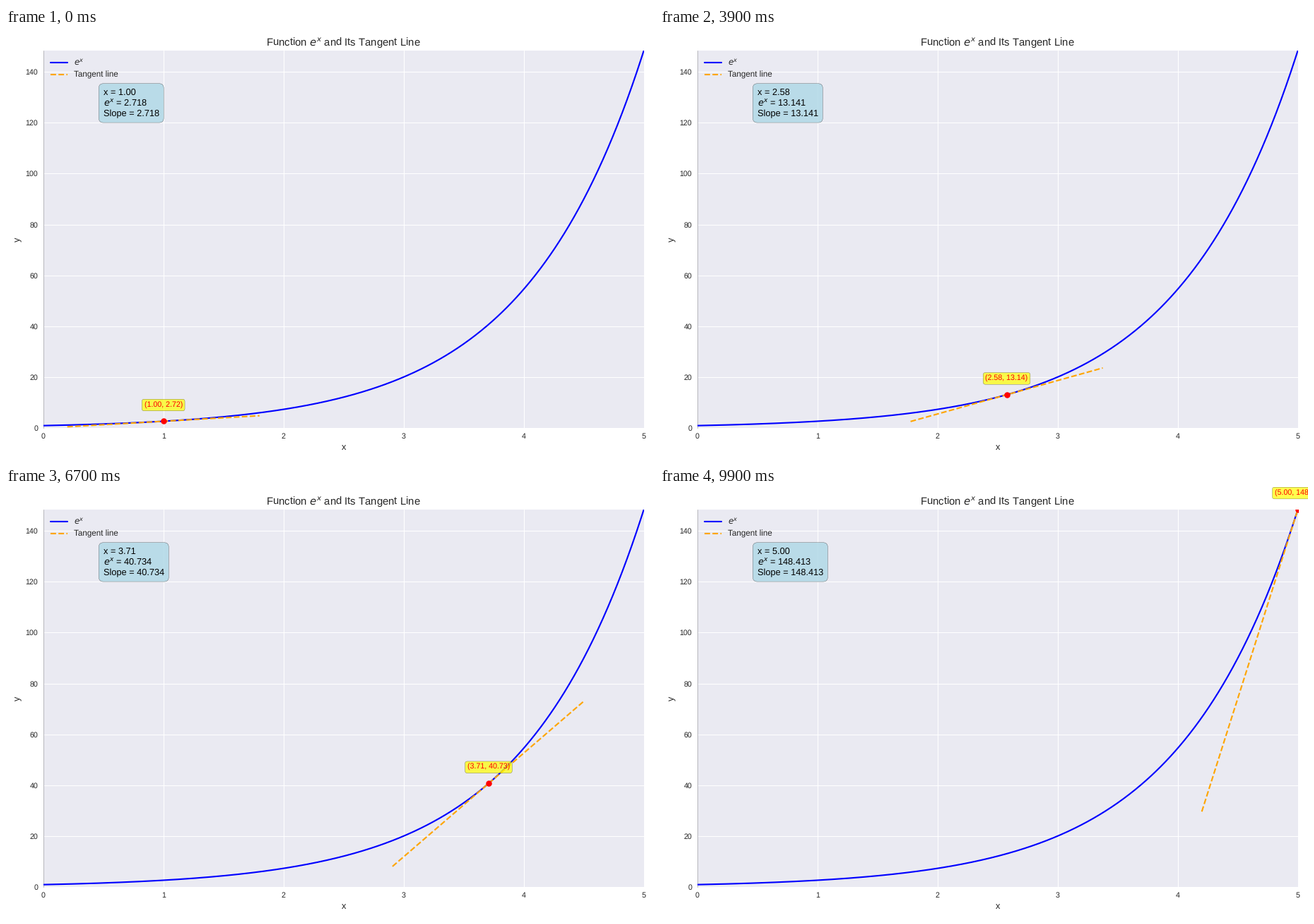
Animation of 917 by 611 pixels, one loop 10000 ms. Source, as a matplotlib script:

```python
import numpy as np
import matplotlib.pyplot as plt
from matplotlib.animation import FuncAnimation

W, H, DPI = 917, 611, 76.4
FRAMES, INTERVAL = 100, 100
HALF = 0.8  # half-width of the tangent segment in x
INK = "0.15"

plt.rcParams.update({
    "font.family": "Liberation Sans",
    "mathtext.fontset": "dejavusans",
    "text.hinting": "no_hinting",
    "text.color": INK,
    "axes.labelcolor": INK,
    "axes.facecolor": "#EAEAF2",
    "axes.linewidth": 0,
    "axes.axisbelow": True,
    "axes.grid": True,
    "grid.color": "white",
    "grid.linestyle": "-",
    "grid.linewidth": 1,
    "xtick.color": INK,
    "ytick.color": INK,
    "xtick.labelsize": 10,
    "ytick.labelsize": 10,
    "xtick.major.size": 0,
    "ytick.major.size": 0,
    "xtick.major.pad": 6.5,
    "ytick.major.pad": 7,
    "lines.solid_capstyle": "round",
    "lines.markeredgewidth": 0,
    "patch.linewidth": 0.3,
    "legend.frameon": False,
    "legend.numpoints": 1,
})

# The small surplus guards against rounding down a pixel.
fig = plt.figure(figsize=((W + 0.01) / DPI, (H + 0.01) / DPI), dpi=DPI,
                 facecolor="white")
left, right, top, bottom = 52.7, 902.7, 31.6, 567.3
ax = fig.add_axes([left / W, 1 - bottom / H, (right - left) / W, (bottom - top) / H])
ax.set_xlim(0, 5)
ax.set_ylim(0, np.exp(5))
ax.set_title("Function $e^x$ and Its Tangent Line", fontsize=14)
ax.set_xlabel("x", fontsize=12)
ax.set_ylabel("y", fontsize=12)
ax.axvline(0, color="#b4b4ba", lw=0.9, clip_on=False, zorder=1.5)

xs = np.linspace(0, 5, 500)
ax.plot(xs, np.exp(xs), color="blue", lw=2, label="$e^x$")
tangent, = ax.plot([], [], color="orange", ls="--", lw=2, label="Tangent line")
dot, = ax.plot([], [], "ro", ms=8)
ax.legend(loc="upper left", fontsize=11)

info = ax.text(0.1, 0.9, "", transform=ax.transAxes, fontsize=12, color="black",
               va="top",
               bbox=dict(boxstyle="round,pad=0.5", facecolor="lightblue", alpha=0.8))
tag = ax.annotate("", xy=(1, np.e), xytext=(0, 19), textcoords="offset points",
                  ha="center", fontsize=10, color="red",
                  bbox=dict(boxstyle="round,pad=0.3", facecolor="yellow", alpha=0.7))


def update(i):
    x = 1 + 4 * i / (FRAMES - 1)
    y = np.exp(x)
    tangent.set_data([x - HALF, x + HALF], [y * (1 - HALF), y * (1 + HALF)])
    dot.set_data([x], [y])
    info.set_text(f"x = {x:.2f}\n$e^x$ = {y:.3f}\nSlope = {y:.3f}")
    tag.xy = (x, y)
    tag.set_text(f"({x:.2f}, {y:.2f})")
    return tangent, dot, info, tag


anim = FuncAnimation(fig, update, frames=FRAMES, interval=INTERVAL,
                     repeat=True, repeat_delay=0, blit=False)
plt.show()
```
